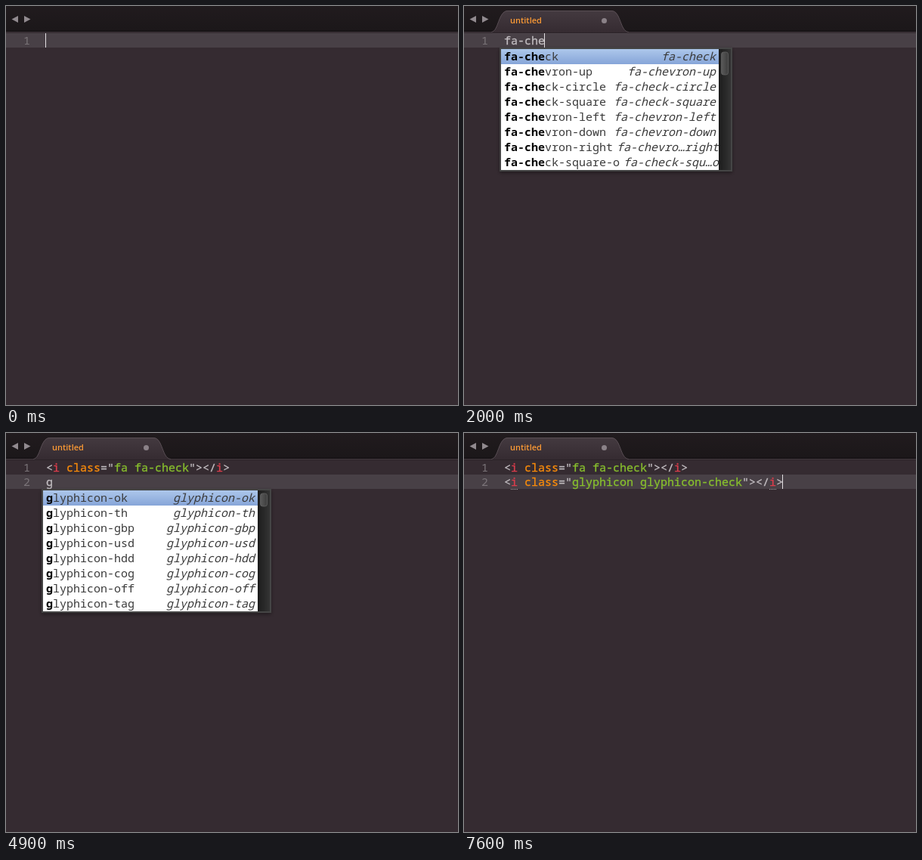
An HTML page that plays this animation: 598 by 528 pixels, repeating every 8 s.

```html
<!DOCTYPE html>
<html lang="en">
<head>
<meta charset="utf-8">
<title>Editor completion</title>
<style>
  html, body { margin: 0; width: 100%; height: 100%; overflow: hidden; background: #352b31; }
  svg { display: block; width: 598px; height: 528px; }
  text { font: 15px "Noto Sans Mono", monospace; white-space: pre; }
  .code { fill: #c3bec2; stroke: #c3bec2; stroke-width: .3px; }
  .tag { fill: #dc3d4c; stroke: #dc3d4c; }
  .attr { fill: #fb8c0a; stroke: #fb8c0a; }
  .value { fill: #88c02d; stroke: #88c02d; }
  .number { fill: #7b7479; }
  .item { fill: #3a3a3a; }
  .match { fill: #000; font-weight: 700; }
  .hint { fill: #3a3a3a; font-style: italic; }
  .title { font: 600 11px "Open Sans", sans-serif; fill: #fb9a35; }
  .underline { stroke: #a9a2a7; stroke-dasharray: 1 1; }
</style>
</head>
<body>
<svg viewBox="0 0 598 528">
  <defs>
    <linearGradient id="bar" x2="0" y2="1">
      <stop stop-color="#211b1e"/><stop offset="1" stop-color="#1b1719"/>
    </linearGradient>
    <linearGradient id="tabFill" x2="0" y2="1">
      <stop stop-color="#443a40"/><stop offset="1" stop-color="#352b31"/>
    </linearGradient>
    <linearGradient id="selected" x2="0" y2="1">
      <stop stop-color="#adc7eb"/><stop offset="1" stop-color="#86a5d8"/>
    </linearGradient>
    <linearGradient id="track">
      <stop stop-color="#1c1c1c"/><stop offset="1" stop-color="#343434"/>
    </linearGradient>
    <linearGradient id="thumb">
      <stop stop-color="#5a5a5a"/><stop offset="1" stop-color="#3d3d3d"/>
    </linearGradient>
    <filter id="shadow" x="-10%" y="-10%" width="120%" height="125%">
      <feDropShadow dx="0" dy="2" stdDeviation="2.5" flood-opacity=".4"/>
    </filter>
  </defs>
  <rect width="598" height="528" fill="#352b31"/>
  <rect width="598" height="34" fill="url(#bar)"/>
  <rect y="33" width="598" height="1" fill="#0f0c0e"/>
  <rect y="34" width="598" height="1" fill="#463c42"/>
  <rect y="35" width="598" height="1" fill="#2b2328"/>
  <path d="M7.5 17.5L16 13v9zM32.500 17.500L24 13v9z" fill="#918a8f"/>
  <g id="tab">
    <path d="M36 35C46 34 45 6 58 6H195C208 6 206 34 218 35Z" fill="url(#tabFill)"/>
    <path d="M36 34.500C46 34 45 6.500 58 6.500H195C208 6.500 206 34 218 34.500" fill="none" stroke="#594e54"/>
    <text class="title" x="61" y="23">untitled</text>
    <circle cx="185.500" cy="19.500" r="3.500" fill="#8b8288"/>
  </g>
  <g id="view"></g>
</svg>
<script>
const LOOP = 8000, CHAR = 9, LEFT = 53, ROW = 19, TOP = 36;
const escape = s => s.replace(/&/g, '&amp;').replace(/</g, '&lt;');
const span = (cls, s) => `<tspan class="${cls}">${escape(s)}</tspan>`;
const rect = (x, y, w, h, fill, more = '') =>
  `<rect x="${x}" y="${y}" width="${w}" height="${h}" fill="${fill}" ${more}/>`;
const text = (cls, x, y, inner) => `<text class="${cls}" x="${x}" y="${y}">${inner}</text>`;

const rowTop = line => TOP + line * ROW;
const highlight = line =>
  rect(0, rowTop(line), 598, ROW, '#484046') + (line ? '' : rect(0, TOP, 598, 1, '#4e464c'));
const number = line => text('number', 23, rowTop(line) + 15, line + 1);
const caret = (line, col) => rect(LEFT - 1 + col * CHAR, rowTop(line), 1, ROW, '#e4e0e3');
const code = (line, inner) => text('code', LEFT, rowTop(line) + 15, inner);
const iconTag = cls => escape('<') + span('tag', 'i') + ' ' + span('attr', 'class') + '="' +
  span('value', cls) + '"' + escape('></') + span('tag', 'i') + '>';

function underline(line, col) {
  const x = LEFT + col * CHAR, y = rowTop(line) + ROW + .5;
  return `<path class="underline" d="M${x} ${y}h${CHAR}"/>`;
}

// Asterisks in an item enclose its matched letters.
function popup(line, right, items, thumb = 17) {
  const top = rowTop(line) + 21;
  let out = rect(47, top - 2, right - 29, 164, '#454545', 'filter="url(#shadow)"') +
    rect(49, top, right - 49, 160, '#fff') +
    rect(49, top, right - 49, 20, 'url(#selected)') +
    rect(right, top, 16, 160, 'url(#track)') +
    rect(right + 3.5, top + 4, 9, thumb, 'url(#thumb)', 'rx="3" stroke="#686868" stroke-width=".7"');
  items.forEach(([item, hint], i) => {
    const name = item.replace(/\*/g, ''), y = top + 15 + i * 20;
    const x = hint.includes('…') ? LEFT + name.length * CHAR + 5 : right - 4 - hint.length * CHAR;
    const parts = item.split('*').map((s, k) => k % 2 ? span('match', s) : escape(s));
    out += text('item', LEFT, y, parts.join('')) + text('hint', x, y, escape(hint));
  });
  return out;
}

const words = s => s.split(' ');
const prefixed = (query, names, hints = {}) =>
  names.map(n => [`*${query}*${n.slice(query.length)}`, hints[n] || n]);
const glyph = (names, mark, hints = {}) =>
  names.map(n => [mark(n), hints[n] || 'glyphicon-' + n]);

const tags = prefixed('f', words('form figure footer foreach fieldset figcaption fieldset font'))
  .map(([item, name], i) => [item,
    i > 5 ? 'Tag' : name === 'foreach' ? '<?php foreach (… <?php endforeach ?>' : `<${name}>`]);
const faShort = words('fa-qq fa-tty fa-bug fa-eye fa-cog fa-car fa-cab fa-cut');
const faC = words('fa-cab fa-car fa-cny fa-cog fa-cut fa-css3 fa-cube fa-copy');
const faChe = words('fa-check fa-chevron-up fa-check-circle fa-check-square fa-chevron-left ' +
  'fa-chevron-down fa-chevron-right fa-check-square-o');
const faCh = ['fa-child', 'fa-chain', ...faChe.slice(0, 6)];
const faHints = { 'fa-chevron-right': 'fa-chevro…right', 'fa-check-square-o': 'fa-check-squ…o' };

const glyShort = words('ok th gbp usd hdd cog off tag').map(n => 'glyphicon-' + n);
const glyC = glyph(words('cog cloud check camera cutlery comment calendar credit-card'),
  n => `*gly*phicon-*c*${n.slice(1)}`, {
    camera: 'glyphicon-came…', cutlery: 'glyphicon-cut…', comment: 'glyphicon-com…',
    calendar: 'glyphicon-ca…', 'credit-card': 'glyphicon…'
  });
const glyCh = glyph(words('check chevron-up chevron-down chevron-left chevron-right hdd home heart'),
  n => n.startsWith('ch') ? `*gly*phicon-*ch*${n.slice(2)}` : `*gly*phi*c*on-*h*${n.slice(1)}`, {
    'chevron-up': 'glyphicon-…', 'chevron-down': 'glyphico…',
    'chevron-left': 'glyphico…', 'chevron-right': 'glyphic…'
  });

const fa = iconTag('fa fa-check'), gly = iconTag('glyphicon glyphicon-check');
const before = line => line ? number(0) + code(0, fa) : '';
const typing = (line, typed, blink, right, items, thumb) => before(line) + highlight(line) +
  number(line) + code(line, typed) + (blink ? caret(line, typed.length) : '') +
  popup(line, right, items, thumb);
const done = (line, tag, lit, marks = [], col = 0) => before(line) + (lit ? highlight(line) : '') +
  number(line) + code(line, tag) + marks.map(c => underline(line, c)).join('') +
  (col ? caret(line, col) : '');

const steps = [
  [0, highlight(0) + number(0) + caret(0, 0)],
  [1000, typing(0, 'f', true, 459, tags)],
  [1200, typing(0, 'fa', false, 333, prefixed('fa', faShort))],
  [1400, typing(0, 'fa-', false, 333, prefixed('fa-', faShort))],
  [1600, typing(0, 'fa-c', true, 333, prefixed('fa-c', faC))],
  [1800, typing(0, 'fa-ch', true, 333, prefixed('fa-ch', faCh))],
  [2000, typing(0, 'fa-che', true, 337, prefixed('fa-che', faChe, faHints), 30)],
  [3000, done(0, fa, false)],
  [3500, done(0, fa, true)],
  [3700, done(0, fa, true, [1, 25])],
  [3900, done(0, fa, true, [1, 25], 27)],
  [4900, typing(1, 'g', false, 333, prefixed('g', glyShort))],
  [5100, typing(1, 'gl', true, 333, prefixed('gl', glyShort))],
  [5300, typing(1, 'gly', true, 333, prefixed('gly', glyShort))],
  [5500, typing(1, 'glyc', true, 337, glyC)],
  [5700, typing(1, 'glych', true, 337, glyCh)],
  [6700, done(1, gly, false)],
  [7200, done(1, gly, true)],
  [7400, done(1, gly, true, [1, 39])],
  [7600, done(1, gly, true, [1, 39], 41)]
];

const view = document.getElementById('view'), tab = document.getElementById('tab');
const start = performance.now();
let shown = -1;
function draw() {
  const time = (performance.now() - start) % LOOP;
  const step = steps.filter(s => s[0] <= time).length - 1;
  if (step !== shown) {
    shown = step;
    tab.style.display = step ? '' : 'none';
    view.innerHTML = steps[step][1];
  }
  requestAnimationFrame(draw);
}
draw();
</script>
</body>
</html>
```
